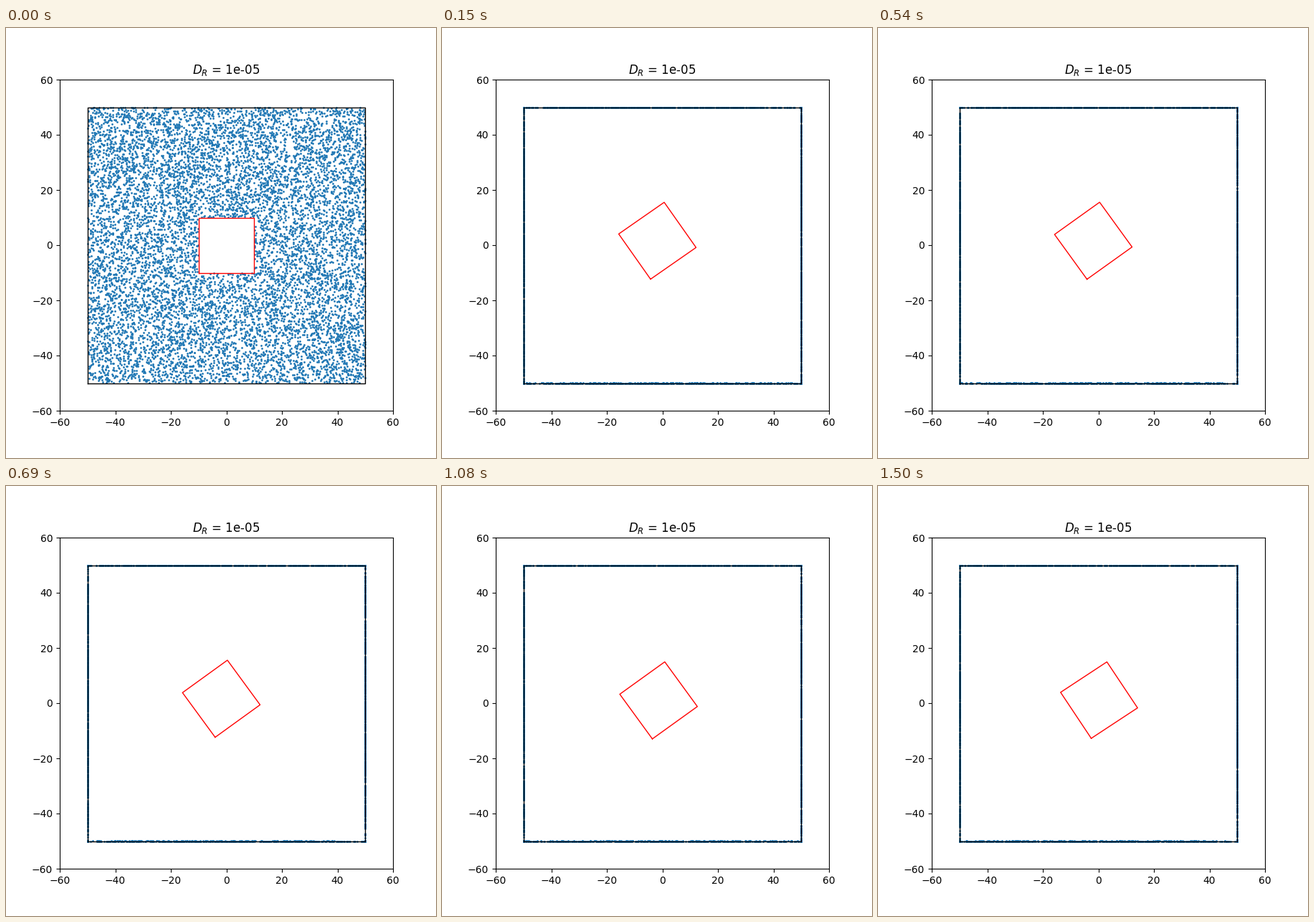
Write a matplotlib script that moves like this. It is 600 by 600 pixels and loops after 1.53 s.

```python
import numpy as np
import matplotlib.pyplot as plt
from matplotlib.animation import FuncAnimation

FRAMES = 51
WALL = 50      # half side of the box
HALF = 10      # half side of the moving square
SPEED = 35     # distance per frame
STICKY = 2300  # particles that stay spread along the walls
SETTLE = 5     # frames until the square has been pushed to rest

# Slow drift of the square once it has settled
DRIFT_AT = [SETTLE, 31, 42, 50]
DRIFT_X = [-1.8, -1.85, -0.8, 0.25]
DRIFT_Y = [1.6, 1.6, 0.3, 1.1]
DRIFT_DEG = [35, 36.5, 35.2, 33.5]

rng = np.random.default_rng(7)
start = rng.uniform(-WALL, WALL, (10800, 2))
start = start[np.abs(start).max(axis=1) > HALF]
theta = rng.uniform(0, 2 * np.pi, len(start))
heading = np.column_stack([np.cos(theta), np.sin(theta)])
reach = ((WALL - np.sign(heading) * start) / np.abs(heading)).min(axis=1)
sticky = np.arange(len(start)) < STICKY


def square_pose(k):
    push = 1 - (1 - min(k / SETTLE, 1)) ** 2
    x, y, deg = [push * np.interp(k, DRIFT_AT, values)
                 for values in (DRIFT_X, DRIFT_Y, DRIFT_DEG)]
    a = np.radians(deg)
    turn = np.array([[np.cos(a), -np.sin(a)], [np.sin(a), np.cos(a)]])
    return np.array([x, y]), turn


def push_out(pos, center, turn):
    """Move particles inside the square onto its edge."""
    local = (pos - center) @ turn
    size = np.abs(local).max(axis=1)
    inside = size < HALF
    local[inside] *= (HALF / np.maximum(size[inside], 1e-6))[:, None]
    pos[inside] = local[inside] @ turn.T + center
    return pos


def particles(k, center, turn):
    noise = np.random.default_rng(100 + k)
    pos = start + heading * np.minimum(SPEED * k, reach)[:, None]
    hit = SPEED * k >= reach

    # Most particles slide into a corner, the rest jitter along their wall
    slid = hit & ~sticky
    pos[slid] = WALL * np.sign(heading[slid])
    held = np.flatnonzero(hit & sticky)
    along = np.abs(pos[held]).argmin(axis=1)
    pos[held, along] += noise.normal(0, 8, len(held))
    pos[held, 1 - along] = WALL * np.sign(pos[held, 1 - along])
    pos = np.clip(pos, -WALL, WALL)

    # Some particles rest slightly above the floor
    floor = (pos[:, 1] == -WALL) & (noise.random(len(pos)) < 0.25)
    pos[floor, 1] += 0.06
    return push_out(pos, center, turn)


def outline(half):
    return half * np.array([(-1, -1), (1, -1), (1, 1), (-1, 1), (-1, -1)])


fig, ax = plt.subplots(figsize=(6, 6), dpi=100)
ax.set_xlim(-60, 60)
ax.set_ylim(-60, 60)
ax.set_title(r"$D_R$ = 1e-05")
dots, = ax.plot([], [], "o", ms=1, color="tab:blue", zorder=2)
ax.plot(*outline(WALL).T, color="black", lw=1, zorder=3)
square, = ax.plot([], [], color="red", lw=1, zorder=3)


def update(k):
    center, turn = square_pose(k)
    dots.set_data(*particles(k, center, turn).T)
    square.set_data(*(outline(HALF) @ turn.T + center).T)
    return dots, square


anim = FuncAnimation(fig, update, frames=FRAMES, interval=30,
                     repeat=True, repeat_delay=0)
plt.show()
```
